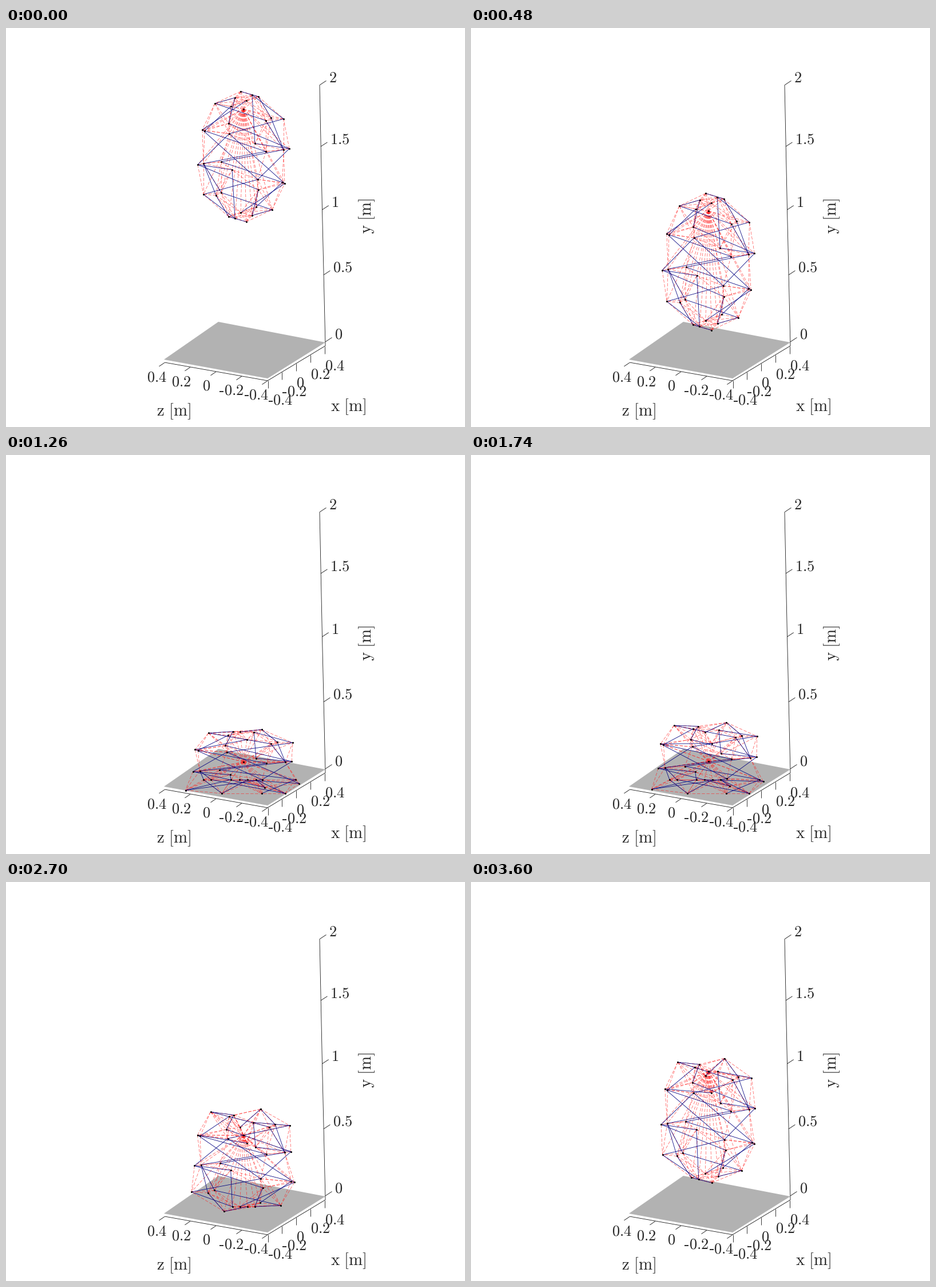
These frames come from a looping animation (802x698 px, 3660 ms). A matplotlib script:

```python
import matplotlib.pyplot as plt
import numpy as np
from matplotlib.animation import FuncAnimation
from matplotlib.collections import LineCollection

W, H, DPI = 802, 698, 100
PX = 72 / DPI
FRAMES, STEP = 61, 60
AXIS_X, FLOOR_Y = 415, 580
REACH = 60

plt.rcParams["mathtext.fontset"] = "cm"

# Three zigzag strands of joints around the centre; the body is
# point-symmetric, so their mirror image gives the other half.
half = np.array([
    (-5, -114), (26, -105), (48, -68), (70, -12), (39, -63), (-50, -93),
    (-15, -103), (-26, -58), (80, -14), (20, -23), (15, -108), (70, -66),
    (-25, -40), (-22, -88), (-68, -45), (39, -9), (5, -98), (-72, -47)], float)
body = np.vstack([half, -half])
N, HUB = len(half), len(body)

# Each strand ends on a joint of the mirrored half.
strands = [[*range(13), N + 8], [13, 14, 15, N + 3], [16, 17, N + 12]]
upper = [pair for s in strands for pair in zip(s, s[1:])]
struts = np.array(upper + [((i + N) % HUB, (j + N) % HUB) for i, j in upper])

# Cables join all close joints, and the hub to every joint.
gap = np.linalg.norm(body[:, None] - body, axis=2)
near = np.argwhere(np.triu(gap < REACH, 1))
spokes = np.column_stack([np.full(HUB, HUB), np.arange(HUB)])
cables = np.vstack([near, spokes])

# Key states: centre height, stretch, dent of the top, flare, hub height.
times = np.array([0, 8, 21, 37, 45, 53, 60])
states = np.array([
    (225, 1.00, 0, 0.00, 142),
    (409, 1.05, 0, 0.04, 320),
    (545, 0.63, 15, 0.45, 537),
    (518, 0.81, 60, 0.36, 510),
    (484, 0.88, 60, 0.30, 443),
    (449, 0.98, 60, 0.20, 376),
    (410, 1.02, 60, 0.15, 331)])
slopes = np.gradient(states, times, axis=0)
slopes[1] = (23, 0, 0, 0, 23)
slopes[2] = 0


def state_at(frame):
    """Cubic motion between key states, kept within their limits."""
    k = min(np.searchsorted(times, frame, side="right") - 1, len(times) - 2)
    span = times[k + 1] - times[k]
    t = (frame - times[k]) / span
    a, b = states[k], states[k + 1]
    blend = t * t * (3 - 2 * t)
    pull = t * (1 - t) ** 2 * slopes[k] - t * t * (1 - t) * slopes[k + 1]
    s = a + (b - a) * blend + span * pull
    return np.clip(s, np.minimum(a, b), np.maximum(a, b))


dx, dy = body.T
cap = np.exp(-((dx - 3) / 15) ** 2) * (dy < -80)
flank = np.clip(np.abs(dy) / 60, 0, 1) * np.where(dy > 0, 1, 0.5)
# Neighbouring joints land in turn at the back and front of the floor.
ground = FLOOR_Y + 12 * np.where(np.arange(HUB) % 2, 1, -1)


def joints_at(frame):
    middle, stretch, dent, flare, hub = state_at(frame)
    x = AXIS_X + dx * (1 + flare * flank)
    y = np.minimum(middle + stretch * dy + dent * cap, ground)
    return np.vstack([np.column_stack([x, y]), (AXIS_X, hub)])


fig = plt.figure(figsize=(W / DPI, H / DPI), dpi=DPI, facecolor="white")
ax = fig.add_axes([0, 0, 1, 1])
ax.set_xlim(0, W)
ax.set_ylim(H, 0)
ax.axis("off")


def line(*points, width=0.85):
    xs, ys = zip(*points)
    ax.plot(xs, ys, color="#1a1a1a", lw=width * PX,
            solid_capstyle="butt", zorder=2)


def label(x, y, text, size=26.4, **kw):
    ax.text(x, y, rf"$\mathrm{{{text}}}$", fontsize=size * PX,
            color="#262626", va="baseline", **kw)


def number(x, y, value, centred=False):
    """Tick number with a short hyphen as its sign."""
    text = f"{abs(value):g}"
    sign = 8.5 if value < 0 else 0
    if centred:
        x -= (13 * len(text) - 6 * ("." in text) + sign) / 2
    if sign:
        line((x + 1, y - 6), (x + 8, y - 6), width=1.8)
    label(x + sign, y, text)


ax.fill([276, 371, 558, 457], [580, 514, 550, 613], color="#b2b2b2", lw=0, zorder=1)
line((277, 585), (457, 617), (558, 556))
line((548, 100), (552.5, 318), (558, 556))

for v in np.arange(0, 2.1, 0.5):
    x = 558 - 6.5 * v + 0.75 * v * v
    y = 549 - 237.2 * v + 6.3 * v * v
    line((x, y), (x + 11.5, y - 7.5))
    number(x + 16, y - 5, v)

for i in range(5):
    v = round(0.4 - 0.2 * i, 1)
    x, y = 277 + 45 * i, 585.5 + 7.9 * i
    line((x, y), (x - 9.5, y + 6.5))
    number(262 + 43.6 * i, 618.5 + 7.7 * i, v, centred=True)
    x, y = 457.5 + 24.8 * i, 617 - 15 * i
    line((x, y), (x, y + 13))
    number(x, y + 41.5, -v)

label(263, 678, r"z\ [m]", 29)
label(567, 670, r"x\ [m]", 29)
label(638, 360, r"y\ [m]", 29, rotation=90, rotation_mode="anchor")

red = LineCollection([], colors="#ff2020", linewidths=0.55 * PX,
                     linestyles=[(0, (10, 5))], zorder=3)
blue = LineCollection([], colors="#000080", linewidths=0.8 * PX, zorder=4)
ax.add_collection(red, autolim=False)
ax.add_collection(blue, autolim=False)
dots, = ax.plot([], [], "o", color="black", ms=3 * PX, mew=0, zorder=5)


def draw(frame):
    p = joints_at(frame)
    red.set_segments(p[cables])
    blue.set_segments(p[struts])
    dots.set_data(p[:, 0], p[:, 1])
    return red, blue, dots


anim = FuncAnimation(fig, draw, frames=FRAMES, interval=STEP,
                     repeat=True, repeat_delay=0)
plt.show()
```
